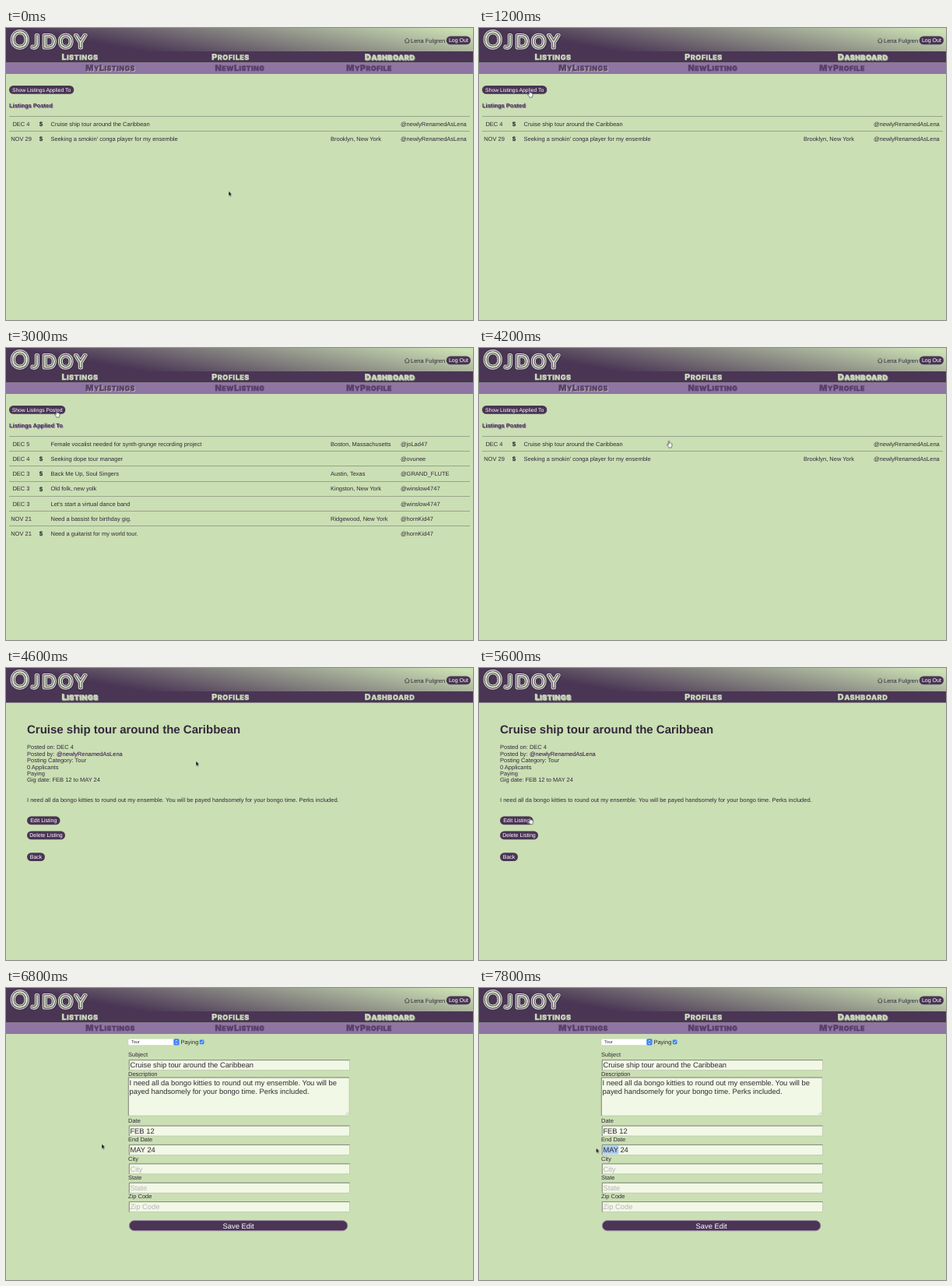
These frames come from a looping animation (600 px wide and 375 px high, 8000 ms). An HTML page:

```html
<!DOCTYPE html>
<html lang="en">
<head>
<meta charset="utf-8">
<title>Gig listings</title>
<style>
  html, body { margin: 0; width: 100%; height: 100%; overflow: hidden; background: #cadfb3; }
  svg { display: block; width: 100vw; height: 100vh; }
  text { font: 7.5px "Liberation Sans", Arial, sans-serif; fill: #33293c; text-rendering: geometricPrecision; white-space: pre; }
  .mid { text-anchor: middle; }
  .head { font-weight: bold; fill: #4a3555; filter: drop-shadow(1px 1px .5px #8d6ca3); }
  .link { fill: #4a3555; filter: drop-shadow(.6px .6px .4px #8d6ca3); }
  .pay { font-weight: bold; font-size: 8px; filter: drop-shadow(.7px .7px .3px #8f9a86); }
  .title { font-size: 15px; font-weight: bold; }
  .field { font-size: 9.375px; fill: #2f2b33; }
  .hint { fill: #b9b3bd; }
  .button { fill: #fff; }
  .nav text { font-family: Inter, Lato, sans-serif; font-weight: 900; letter-spacing: .45px; word-spacing: -2px; text-anchor: middle; stroke-width: .35px; }
  .nav .main { fill: #cbd9bb; stroke: #cbd9bb; filter: drop-shadow(.6px .6px 0 #2c2035); }
  .nav .sub { fill: #573f67; stroke: #573f67; }
  .nav .on.main { filter: drop-shadow(1.2px 1.2px .6px #9aa193); }
  .nav .on.sub { filter: drop-shadow(1.3px 1.2px .5px #b3b7a5); }
  .logo text { font-family: Lato, sans-serif; font-weight: 300; letter-spacing: 4.4px; stroke-linejoin: round; }

  .posted, .applied, .detail, .form, .arrow, .hand, .beam, .sel { animation: 8s step-end infinite; visibility: hidden; }
  .posted { animation-name: posted; }
  .applied { animation-name: applied; }
  .detail { animation-name: detail; }
  .form { animation-name: form; }
  .arrow { animation-name: arrow; }
  .hand { animation-name: hand; }
  .beam { animation-name: beam; }
  .cursor { animation: move 8s infinite; }
  .sel { animation-name: select; transform-origin: 179.3px 0; }

  @keyframes posted { 0%, 42.5% { visibility: visible } 17.5%, 57.5%, 100% { visibility: hidden } }
  @keyframes applied { 0%, 42.5%, 100% { visibility: hidden } 17.5% { visibility: visible } }
  @keyframes detail { 0%, 72.5%, 100% { visibility: hidden } 57.5% { visibility: visible } }
  @keyframes form { 0% { visibility: hidden } 72.5%, 100% { visibility: visible } }
  @keyframes arrow {
    0%, 20%, 45%, 57.5%, 72.5%, 97.5%, 100% { visibility: visible }
    12.5%, 35%, 47.5%, 67.5%, 87.5% { visibility: hidden }
  }
  @keyframes hand {
    0%, 20%, 45%, 57.5%, 72.5%, 100% { visibility: hidden }
    12.5%, 35%, 47.5%, 67.5% { visibility: visible }
  }
  @keyframes beam { 0%, 97.5%, 100% { visibility: hidden } 87.5% { visibility: visible } }
  @keyframes select {
    0% { visibility: hidden; transform: scaleX(.3) }
    92.5% { visibility: visible; transform: scaleX(.35) }
    95%, 100% { visibility: visible; transform: none }
  }
  /* the pointer is redrawn every 200 ms */
  @keyframes move {
    0% { transform: translate(286px, 209.5px); animation-timing-function: step-end }
    5% { transform: translate(286px, 209.5px); animation-timing-function: steps(4) }
    15% { transform: translate(65px, 80.5px); animation-timing-function: step-end }
    20% { transform: translate(72px, 80px); animation-timing-function: step-end }
    22.5% { transform: translate(77.5px, 78.5px); animation-timing-function: step-end }
    32.5% { transform: translate(77.5px, 78.5px); animation-timing-function: steps(2) }
    37.5% { transform: translate(65px, 80.5px); animation-timing-function: step-end }
    42.5% { transform: translate(65px, 80.5px); animation-timing-function: steps(4) }
    52.5% { transform: translate(244px, 119.5px); animation-timing-function: step-end }
    57.5% { transform: translate(244px, 119.5px); animation-timing-function: steps(4) }
    67.5% { transform: translate(65.5px, 192.2px); animation-timing-function: step-end }
    72.5% { transform: translate(66px, 193.5px); animation-timing-function: step-end }
    80% { transform: translate(66px, 193.5px); animation-timing-function: steps(4) }
    90% { transform: translate(180px, 207px); animation-timing-function: steps(3) }
    97.5%, 100% { transform: translate(150.5px, 205.5px) }
  }
</style>
</head>
<body>
<svg id="stage" viewBox="0 0 600 375" preserveAspectRatio="none"></svg>
<script>
const DARK = '#4a3555', LILAC = '#8f75a2', CREAM = '#dbe8ca', GREEN = '#cadfb3';

const text = (x, y, str, cls = '', size) =>
  `<text x="${x}" y="${y}" class="${cls}"${size ? ` style="font-size:${size}px"` : ''}>${str}</text>`;
const rect = (x, y, w, h, fill, extra = '') =>
  `<rect x="${x}" y="${y}" width="${w}" height="${h}" fill="${fill}" ${extra}/>`;
const group = (cls, ...parts) => `<g class="${cls}">${parts.join('')}</g>`;
const button = (x, y, w, label, size = 7, h = 10.8) =>
  rect(x, y, w, h, DARK, `rx="${h / 2}"`) + text(x + w / 2, y + h / 2 + 2.5, label, 'button mid', size);

// Large initials with smaller capitals after them
const caps = (str, big, small) => str.toUpperCase().split(' ').map(word =>
  `<tspan style="font-size:${big}px">${word[0]}</tspan><tspan style="font-size:${small}px">${word.slice(1)}</tspan>`).join(' ');
const mainLink = (x, label, on) => text(x, 41, caps(label, 10.9, 9.1), 'main' + (on ? ' on' : ''));
const subLink = (x, label, on) => text(x, 55, caps(label, 10.6, 8.8), 'sub' + (on ? ' on' : ''));

const mainNav = active => group('nav',
  ...[[95, 'Listings'], [288.5, 'Profiles'], [493, 'Dashboard']].map(([x, s]) => mainLink(x, s, s === active)));
const subNav = active => rect(0, 44.5, 600, 14.5, LILAC) + group('nav',
  ...[[134, 'My Listings'], [300.5, 'New Listing'], [466.5, 'My Profile']].map(([x, s]) => subLink(x, s, s === active)));

const logo = () => {
  const layer = (color, width, shift = 0) =>
    `<text x="${6.5 + shift}" y="${25 + shift}" style="fill:${color};stroke:${color};stroke-width:${width}">${caps('Ojdoy', 28.5, 22)}</text>`;
  return group('logo', layer('#3d2d48', 5, .9), layer(CREAM, 5), layer('#5f4c6b', 2.9), layer(CREAM, .7));
};

const header = () => rect(0, 0, 600, 30, 'url(#sky)') + logo() +
  `<path d="M512.3 16.2l3-3.2 3 3.2h-.9v2.7h-4.2v-2.7z" fill="none" stroke="#33293c" stroke-width=".7"/>` +
  text(520, 18.6, 'Lena Fulgren') + button(565.7, 10.5, 31.3, 'Log Out') + rect(0, 30, 600, 14.5, DARK);

const listing = (rows, heading, label, width) =>
  mainNav('Dashboard') + subNav('My Listings') +
  button(4, 74, width, label, 6.8) + text(4, 101.8, heading, 'head') +
  rows.map(([date, pays, title, place, user], i) => {
    const y = 113 + i * 19.2;
    return rect(4, Math.round(y), 592, 1, '#99a28e') + text(19.5, y + 12.7, date, 'mid') +
      (pays ? text(45, y + 13, '$', 'pay mid') : '') +
      text(57.5, y + 12.7, title) + text(417, y + 12.7, place) + text(507, y + 12.7, user);
  }).join('');

const OWNER = '@newlyRenamedAsLena', CRUISE = 'Cruise ship tour around the Caribbean';
const posted = [
  ['DEC 4', 1, CRUISE, '', OWNER],
  ['NOV 29', 1, "Seeking a smokin' conga player for my ensemble", 'Brooklyn, New York', OWNER],
];
const applied = [
  ['DEC 5', 0, 'Female vocalist needed for synth-grunge recording project', 'Boston, Massachusetts', '@joLad47'],
  ['DEC 4', 1, 'Seeking dope tour manager', '', '@ovunee'],
  ['DEC 3', 1, 'Back Me Up, Soul Singers', 'Austin, Texas', '@GRAND_FLUTE'],
  ['DEC 3', 1, 'Old folk, new yolk', 'Kingston, New York', '@winslow4747'],
  ['DEC 3', 0, "Let's start a virtual dance band", '', '@winslow4747'],
  ['NOV 21', 0, 'Need a bassist for birthday gig.', 'Ridgewood, New York', '@hornKid47'],
  ['NOV 21', 1, 'Need a guitarist for my world tour.', '', '@hornKid47'],
];

const detail = () => mainNav('Listings') + text(27, 84.3, CRUISE, 'title') +
  ['Posted on: DEC 4', 'Posted by:', 'Posting Category: Tour', '0 Applicants', 'Paying', 'Gig date: FEB 12 to MAY 24']
    .map((line, i) => text(27, 104.2 + i * 8.45, line)).join('') +
  text(65, 112.6, OWNER, 'link') +
  text(27, 171.8, 'I need all da bongo kitties to round out my ensemble. You will be payed handsomely for your bongo time. Perks included.') +
  button(27, 190.5, 42.5, 'Edit Listing') + button(27, 209.5, 49, 'Delete Listing') + button(27, 237.2, 23, 'Back');

const box = (x, y, w, h) => rect(x, y, w, h, '#f1f8e5', 'stroke="#b9c2ae" stroke-width=".7"') +
  `<path d="M${x} ${y + h}V${y}H${x + w}" fill="none" stroke="#7c8078" stroke-width=".9"/>`;
const field = (label, y, value, hint) =>
  text(157, y - 4.2, label) + box(158.3, y, 283.2, 13) +
  (label === 'End Date' ? rect(159.4, y + 1, 19.9, 11, '#a9cdf5', 'class="sel"') : '') +
  text(159.4, y + 9.8, value || hint, value ? 'field' : 'field hint');

const form = () => mainNav('Dashboard') + subNav() +
  rect(157, 65.2, 65.5, 8.4, '#fff', 'rx="1.6" stroke="#bcc4b2" stroke-width=".4"') +
  rect(215.3, 65.2, 7.2, 8.4, '#3b82f0', 'rx="1.5"') +
  '<path d="M217.5 68.7l1.4-1.7 1.4 1.7M217.5 70.2l1.4 1.7 1.4-1.7" fill="none" stroke="#fff" stroke-width=".7"/>' +
  text(161, 71.3, 'Tour', '', 5.6) + text(224.4, 71.6, 'Paying') +
  rect(248.7, 66.5, 5.8, 5.8, '#3b82f0', 'rx="1.2"') +
  '<path d="M250 69.5l1.2 1.3 2-3" fill="none" stroke="#fff" stroke-width=".8"/>' +
  field('Subject', 92.6, CRUISE) +
  text(157, 113.1, 'Description') + box(157.3, 115, 283.7, 49) +
  '<path d="M436.5 162.8l3.3-3.3M438.5 162.8l1.3-1.3" stroke="#888" stroke-width=".5"/>' +
  text(158.5, 125, 'I need all da bongo kitties to round out my ensemble. You will be', 'field') +
  text(158.5, 135.9, 'payed handsomely for your bongo time. Perks included.', 'field') +
  field('Date', 177, 'FEB 12') + field('End Date', 201.4, 'MAY 24') +
  ['City', 'State', 'Zip Code'].map((s, i) => field(s, 225.8 + i * 24.4, '', s)).join('') +
  rect(158.3, 298.6, 280.6, 13.2, DARK, 'rx="6.6" stroke="#a58fb2" stroke-width=".9"') +
  text(298.6, 308.5, 'Save Edit', 'field button mid');

const cursor = () => group('cursor',
  group('arrow', '<path d="M0 0v6.4l1.5-1.4 1 2.3 1.1-.5-1-2.2h2z" fill="#111" stroke="#fff" stroke-width=".4"/>'),
  group('hand', '<path d="M-.7 .7c0-1 1.3-1 1.4 0v2.2c.4-.4 1.1-.3 1.2.2.4-.3 1-.2 1.1.3.5-.2 1 0 1 .6v1.7c0 1.4-.8 1.8-.8 2.8H-.1c0-.9-1.9-2.5-2.4-3.4-.4-.8.5-1.2 1.1-.6l.7.7z" fill="#fff" stroke="#222" stroke-width=".6"/>'),
  group('beam', '<path d="M-1.4-4Q0-4 0-3Q0-4 1.4-4M0-3V3M-1.4 4Q0 4 0 3Q0 4 1.4 4" fill="none" stroke="#222" stroke-width=".7"/>'));

document.getElementById('stage').innerHTML =
  `<defs><linearGradient id="sky" gradientUnits="userSpaceOnUse" x1="94" y1="15" x2="111.5" y2="-82">
    <stop offset="0" stop-color="${DARK}"/><stop offset="1" stop-color="${GREEN}"/></linearGradient></defs>` +
  rect(0, 0, 600, 375, GREEN) + header() +
  group('posted', listing(posted, 'Listings Posted', 'Show Listings Applied To', 83.3)) +
  group('applied', listing(applied, 'Listings Applied To', 'Show Listings Posted', 72.3)) +
  group('detail', detail()) + group('form', form()) + cursor();
</script>
</body>
</html>
```
